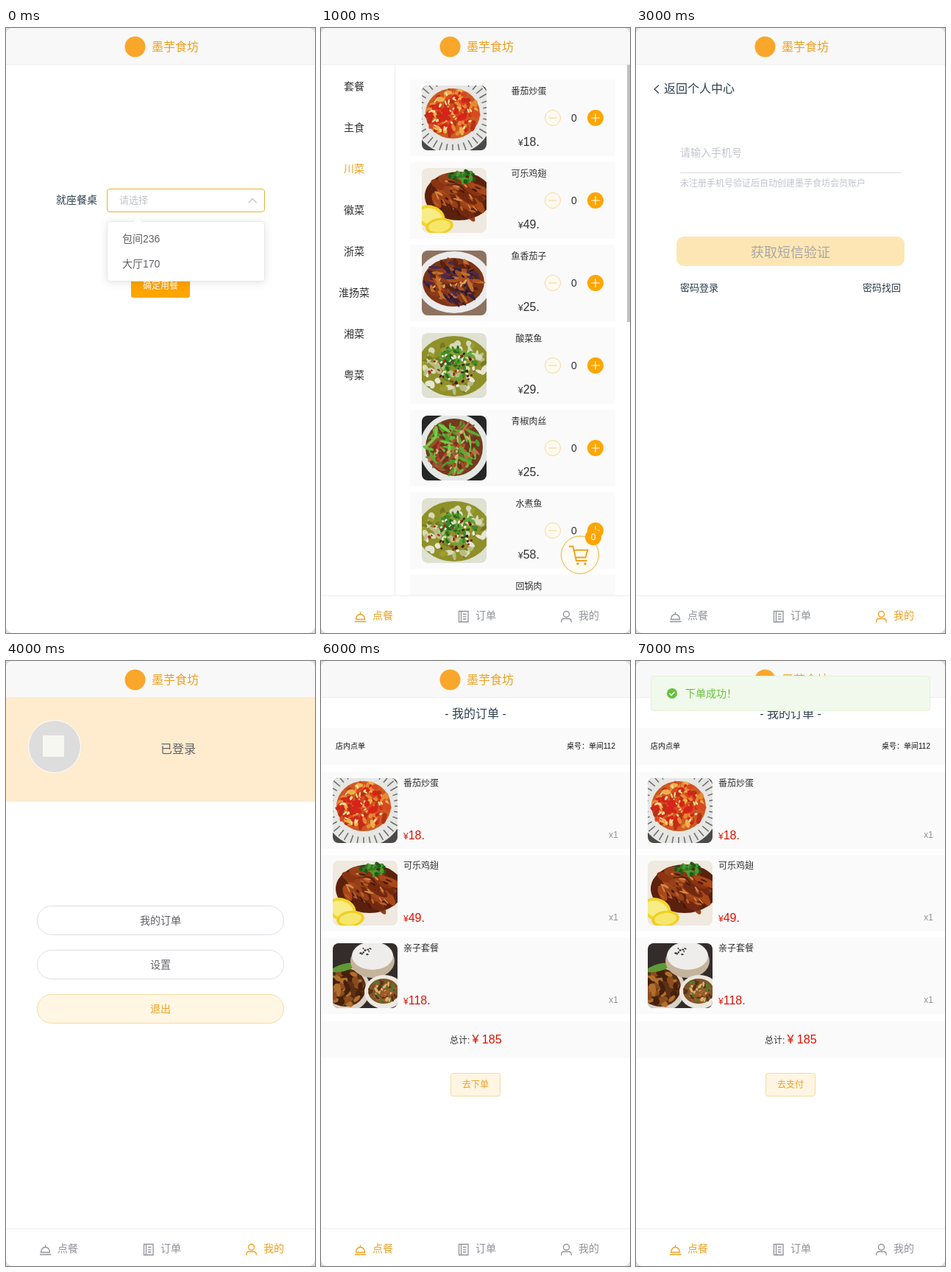
An HTML page for the animation above (8 s loop, 420 px wide and 821 px high).

```html
<!DOCTYPE html>
<html lang="zh-CN">
<head>
<meta charset="utf-8">
<style>
  html, body { margin: 0; width: 100%; height: 100%; overflow: hidden; background: #dedede; }
  svg { display: block; }
  text { font-family: "Liberation Sans", "Noto Sans CJK SC", "Noto Sans CJK", sans-serif; white-space: pre; }
  .shadow { filter: drop-shadow(0 2px 6px rgba(0, 0, 0, .1)); }
</style>
</head>
<body>
<svg id="stage" width="420" height="821" viewBox="0 0 420 821">
  <defs>
    <clipPath id="page"><rect width="420" height="821" rx="9"/></clipPath>
    <clipPath id="thumb"><rect width="88" height="88" rx="8"/></clipPath>
  </defs>
  <g id="screens" clip-path="url(#page)"></g>
</svg>
<script>
const BRAND = '墨芋食坊';
const ORANGE = '#ffa500', ACTIVE = '#eda01f', INK = '#2c3e50', DARK = '#303133';
const GREY = '#909399', BODY = '#606266', HINT = '#c0c4cc', PANEL = '#fafafa';

// Basic shapes; text is placed by its vertical centre.
const text = (x, y, str, size, fill, anchor = 'start') =>
  `<text x="${x}" y="${y + size * .37}" font-size="${size}" fill="${fill}" text-anchor="${anchor}">${str}</text>`;
const rect = (x, y, w, h, fill, r = 0, stroke = 'none') =>
  `<rect x="${x}" y="${y}" width="${w}" height="${h}" rx="${r}" fill="${fill}" stroke="${stroke}"/>`;
const circle = (x, y, r, fill, stroke = 'none') =>
  `<circle cx="${x}" cy="${y}" r="${r}" fill="${fill}" stroke="${stroke}"/>`;
const ellipse = (x, y, rx, ry, fill, turn = 0) =>
  `<ellipse rx="${rx}" ry="${ry}" fill="${fill}" transform="translate(${x} ${y}) rotate(${turn})"/>`;
const line = (d, stroke, width = 1) =>
  `<path d="${d}" fill="none" stroke="${stroke}" stroke-width="${width}"/>`;
const range = (n, draw) => Array.from({ length: n }, (_, i) => draw(i)).join('');

// Scatters small ellipses inside a larger one, turned within the given spread.
function scatter(seed, n, cx, cy, rx, ry, colors, w, h, spread = 180) {
  const random = () => (seed = seed * 16807 % 2147483647) / 2147483647;
  random();
  return range(n, i => {
    const a = random() * Math.PI * 2, d = Math.sqrt(random());
    return ellipse(cx + Math.cos(a) * d * rx, cy + Math.sin(a) * d * ry,
      w * (.6 + random() * .6), h * (.6 + random() * .6), colors[i % colors.length], random() * spread);
  });
}

const dishes = {
  tomato: () => rect(0, 0, 88, 88, '#4b4a48') + circle(42, 38, 55, '#e6e6e3') +
    range(36, i => {
      const a = i * Math.PI / 18, c = Math.cos(a), s = Math.sin(a);
      return line(`M${42 + c * 42},${38 + s * 42}L${42 + c * 53},${38 + s * 53}`, '#6a6a70', 1.5);
    }) + ellipse(42, 38, 37, 34, '#cf5a22') +
    scatter(11, 120, 42, 38, 34, 31, ['#d2281a', '#eeb04c', '#b93018', '#e88a34', '#d9481f'], 5.5, 3) +
    scatter(53, 12, 40, 36, 30, 27, ['#d6241a'], 6, 5) +
    scatter(59, 24, 42, 38, 31, 28, ['#f8dc94'], 3, 1.5),
  wings: () => rect(0, 0, 88, 88, '#efe9df') + ellipse(50, 38, 46, 33, '#5c210d') +
    scatter(23, 24, 51, 38, 37, 27, ['#8a3412', '#a8481a', '#73290f', '#96401a'], 15, 6, 70) +
    scatter(5, 38, 52, 38, 36, 27, ['#d68642', '#bd6328', '#481808'], 4.5, 1.3, 70) +
    scatter(31, 30, 56, 11, 18, 9, ['#2f7a22', '#4c9c2f', '#1f5a18'], 4, 2.5) +
    ellipse(12, 66, 20, 15, '#f0d62e', 20) + ellipse(12, 66, 16, 11, '#f8ec86', 20) +
    ellipse(24, 79, 19, 11, '#eecf24', -8) + ellipse(24, 79, 15, 8, '#f6e76c', -8),
  eggplant: () => rect(0, 0, 88, 88, '#8d7260') + ellipse(44, 43, 51, 42, '#ecebec') +
    ellipse(43, 43, 42, 33, '#7c3516') +
    scatter(17, 95, 43, 43, 36, 28, ['#33203e', '#a9521f', '#4b2b4c', '#c0702c', '#5a220f', '#8e3c18'], 9, 2.8, 80) +
    scatter(8, 30, 45, 42, 33, 26, ['#dca45c', '#b8301c', '#2a1520'], 3.5, 1.3),
  fish: () => rect(0, 0, 88, 88, '#dfe1d2') + ellipse(44, 45, 50, 41, '#8f9029') +
    scatter(41, 85, 44, 46, 43, 36, ['#e4e6d6', '#b9bc80', '#75791f', '#d6d9b8', '#9c9c30'], 6, 3.5) +
    scatter(7, 55, 46, 42, 26, 22, ['#3f8c2a', '#5fa83a', '#28661f'], 4.5, 2.2) +
    scatter(19, 45, 42, 50, 32, 25, ['#a5281a', '#4a1a12', '#e8ead8'], 2.2, 1.7),
  pepper: () => rect(0, 0, 88, 88, '#262626') + circle(44, 44, 47, '#e3e8e4') +
    circle(44, 43, 39, '#74391f') +
    scatter(29, 120, 44, 43, 36, 35, ['#99512c', '#4a9c28', '#bb7048', '#66b83a', '#6a321a'], 7, 2.2) +
    scatter(61, 16, 44, 43, 34, 33, ['#58ae2e', '#7cc74a'], 11, 2) +
    scatter(3, 26, 44, 44, 29, 28, ['#c43a24', '#dfae86'], 3, 1.8),
  combo: () => rect(0, 0, 88, 88, '#332c2a') + ellipse(18, 62, 33, 31, '#d8d3c8') +
    ellipse(17, 60, 28, 26, '#5c2f14') +
    scatter(13, 45, 17, 60, 25, 23, ['#8c4c1e', '#b0702c', '#45200c'], 7, 4) +
    ellipse(15, 33, 17, 5, '#5f9a35', -15) +
    ellipse(54, 24, 30, 23, '#c5b49c') + ellipse(54, 17, 28, 19, '#efedeb') +
    scatter(37, 14, 45, 11, 9, 5, ['#333'], 1.5, 1) +
    ellipse(70, 66, 27, 23, '#ece8e0') + ellipse(69, 65, 21, 17, '#7c5628') +
    scatter(47, 55, 69, 65, 18, 14, ['#4f7a2c', '#b0522a', '#dcb068', '#5a2f18'], 4, 2),
};
const thumb = (x, y, name) =>
  `<g transform="translate(${x} ${y})" clip-path="url(#thumb)">${dishes[name]()}</g>`;
const price = (x, y, amount, fill) =>
  text(x, y, `<tspan font-size="12">¥</tspan>${amount}.`, 16, fill);
const chevron = (x, y, dir, color) => line(`M${x},${y - 5.5}l${6 * dir},5.5l${-6 * dir},5.5`, color, 1.2);
const pill = (y, label, fill, stroke, color) =>
  rect(42.5, y + .5, 335, 39, fill, 19.5, stroke) + text(210, y + 20, label, 14, color, 'middle');

const blank = rect(0, 0, 420, 821, '#fff');
const header = blank + rect(0, 0, 420, 50, '#f8f8f8') + rect(0, 49, 420, 1, '#eee') +
  circle(175.5, 25.5, 14, '#f9a72b') + text(198, 25, BRAND, 16, ACTIVE);

const navIcons = [
  c => line('M47.5,802.5a6,7 0 0 1 12,0zM46,805.5H61.5M53.5,795.5v-3', c, 1.4),
  c => line('M187.5,791.5h12.5v14.5h-12.5zM190.5,791.5v14.5M193,795.5h4.5M193,798.8h4.5M193,802h4.5', c, 1.3),
  c => line('M337.5,795.5a4,4 0 1 1 -8,0a4,4 0 1 1 8,0M326.7,806.5v-1q0,-4 4,-4h5.5q4,0 4,4v1', c, 1.4),
];
const nav = active => rect(0, 770, 420, 51, '#fff') + rect(0, 770, 420, 1, '#eee') +
  ['点餐', '订单', '我的'].map((label, i) => {
    const color = i === active ? ACTIVE : GREY;
    return navIcons[i](color) + text(70 + 140 * i, 797, label, 14, color);
  }).join('');

const tableScreen = () => header +
  text(68, 233, '就座餐桌', 14, INK) +
  rect(137.5, 218.5, 214, 31, '#fff', 3.5, '#e9b32c') +
  text(154, 233, '请选择', 13, HINT) + line('M329.5,237.5l5.5,-6l5.5,6', HINT, 1.2) +
  rect(170, 334, 80, 32, ORANGE, 3) + text(210, 350, '确定用餐', 12, '#fff', 'middle') +
  `<g class="shadow">${rect(137.5, 262.5, 214, 81, '#fff', 4, '#e4e7ed')}</g>` +
  '<path d="M173,263.5l6,-6l6,6z" fill="#fff"/>' +
  text(158, 286, '包间236', 14, BODY) + text(158, 320, '大厅170', 14, BODY);

const menu = [
  ['番茄炒蛋', 18, 'tomato'], ['可乐鸡翅', 49, 'wings'], ['鱼香茄子', 25, 'eggplant'],
  ['酸菜鱼', 29, 'fish'], ['青椒肉丝', 25, 'pepper'], ['水煮鱼', 58, 'fish'], ['回锅肉', 38],
];
const menuCard = ([name, amount, picture], i) => {
  const y = 70 + 112 * i;
  return rect(121, y, 279, 104, PANEL) + (picture ? thumb(137, y + 8, picture) : '') +
    text(282.5, y + 16, name, 12, DARK, 'middle') + price(268, y + 84, amount, DARK) +
    circle(315, y + 52, 10.5, '#fffaf0', '#f8d99a') + line(`M309.5,${y + 52}h11`, '#f3cf88') +
    text(344, y + 52, '0', 14, DARK, 'middle') +
    circle(373, y + 52, 11, ORANGE) + line(`M367,${y + 52}h12M373,${y + 46}v12`, '#fff', 1.2);
};
const menuScreen = () => header + rect(100, 50, 1, 720, '#eee') +
  ['套餐', '主食', '川菜', '徽菜', '浙菜', '淮扬菜', '湘菜', '粤菜'].map((name, i) =>
    text(45, 79 + 56 * i, name, 14, i === 2 ? ACTIVE : DARK, 'middle')).join('') +
  menu.map(menuCard).join('') + rect(416, 50, 4, 349, '#c1c1c1') +
  circle(352, 715, 25.5, '#fffbf3', '#f0b030') +
  line('M337,703.5h5.5l4.5,19.5h14.5M344,708.5h18.5l-3,10h-13', ACTIVE, 1.8) +
  circle(349, 727, 1.8, ACTIVE) + circle(359, 727, 1.8, ACTIVE) +
  circle(370, 691, 11, ORANGE) + text(370, 691, '0', 12, '#fff', 'middle') + nav(0);

const profile = name => header + rect(0, 50, 420, 140, '#ffebcd') + rect(0, 190, 420, 1, '#eee') +
  circle(66, 116, 35.5, '#ddd', '#fff') + rect(50, 101, 29, 29, '#f7f7f1') +
  text(234, 119, name, 16, BODY, 'middle');
const guestScreen = () => profile('未登录') +
  pill(311, '登录', '#fff', '#dcdfe6', BODY) + pill(371, '注册', '#fff6e4', '#f5dca0', ACTIVE) + nav(2);
const memberScreen = () => profile('已登录') +
  pill(332, '我的订单', '#fff', '#dcdfe6', BODY) + pill(392, '设置', '#fff', '#dcdfe6', BODY) +
  pill(452, '退出', '#fff6e4', '#f5dca0', ACTIVE) + nav(2);

const loginScreen = () => header +
  chevron(31, 83, -1, INK) + text(38, 82, '返回个人中心', 16, INK) +
  text(60, 169, '请输入手机号', 14, HINT) + rect(60, 196, 300, 1, '#dcdcdc') +
  text(60, 211, `未注册手机号验证后自动创建${BRAND}会员账户`, 12, HINT) +
  rect(55, 283, 310, 40, '#fde6b4', 10) + text(210, 304, '获取短信验证', 18, '#a8a8a8', 'middle') +
  text(60, 352, '密码登录', 13, INK) + text(360, 352, '密码找回', 13, INK, 'end') + nav(2);

const settingsScreen = () => blank + text(200, 32, '设置', 16, '#777', 'middle') +
  line('M384,25l12,12M396,25l-12,12', BODY, 1.2) +
  ['账号与安全', '帮助与反馈', `关于${BRAND}`, '插件', '隐私'].map((label, i) =>
    rect(0, 75 + 51 * i, 420, 1, '#ececec') + text(40, 101 + 51 * i, label, 16, '#111') +
    chevron(49.5 + 16 * label.length, 100 + 51 * i, 1, '#333')).join('') +
  rect(0, 330, 420, 22, '#f1f1f1') + text(210, 377, '切换账号', 16, '#111', 'middle') +
  rect(0, 402, 420, 12, '#f1f1f1') + text(210, 439, '退出', 16, '#111', 'middle') +
  rect(0, 464, 420, 21, '#f1f1f1');

const order = [menu[0], menu[1], ['亲子套餐', 118, 'combo']];
const orderScreen = action => header +
  text(210, 71, '- 我的订单 -', 16, INK, 'middle') + rect(0, 91, 420, 50, PANEL) +
  text(20, 115, '店内点单', 10, '#111') + text(400, 115, '桌号：单间112', 10, '#111', 'end') +
  order.map(([name, amount, picture], i) => {
    const y = 151 + 112 * i;
    return rect(0, y, 420, 104, PANEL) + thumb(16, y + 8, picture) + text(112, y + 15, name, 12, DARK) +
      price(112, y + 85, amount, '#dd1100') + text(404, y + 85, 'x1', 12, GREY, 'end');
  }).join('') +
  rect(0, 489, 420, 50, PANEL) + text(175, 515, '总计:', 12, DARK) + text(205.5, 513, '¥ 185', 16, '#dd1100') +
  rect(176.5, 559.5, 67, 31, '#fff5e2', 3, '#f5d9a4') + text(210, 575, action, 12, ACTIVE, 'middle') + nav(0);
const toast = () => rect(20.5, 20.5, 379, 47, '#f0f9eb', 4, '#e1f3d8') +
  circle(49, 44, 7, '#67c23a') + line('M45.5,44l2.5,2.5l4.5,-4.5', '#fff', 1.4) +
  text(67, 44, '下单成功！', 14, '#67c23a');

const screens = [
  tableScreen(), menuScreen(), guestScreen(), loginScreen(), memberScreen(),
  settingsScreen(), orderScreen('去下单'), orderScreen('去支付') + toast(),
];
const layer = document.getElementById('screens');
layer.innerHTML = screens.map(s => `<g display="none">${s}</g>`).join('');

function render() {
  const current = Math.floor(performance.now() / 1000) % screens.length;
  [...layer.children].forEach((g, i) => g.setAttribute('display', i === current ? 'inline' : 'none'));
  requestAnimationFrame(render);
}
render();
</script>
</body>
</html>
```
